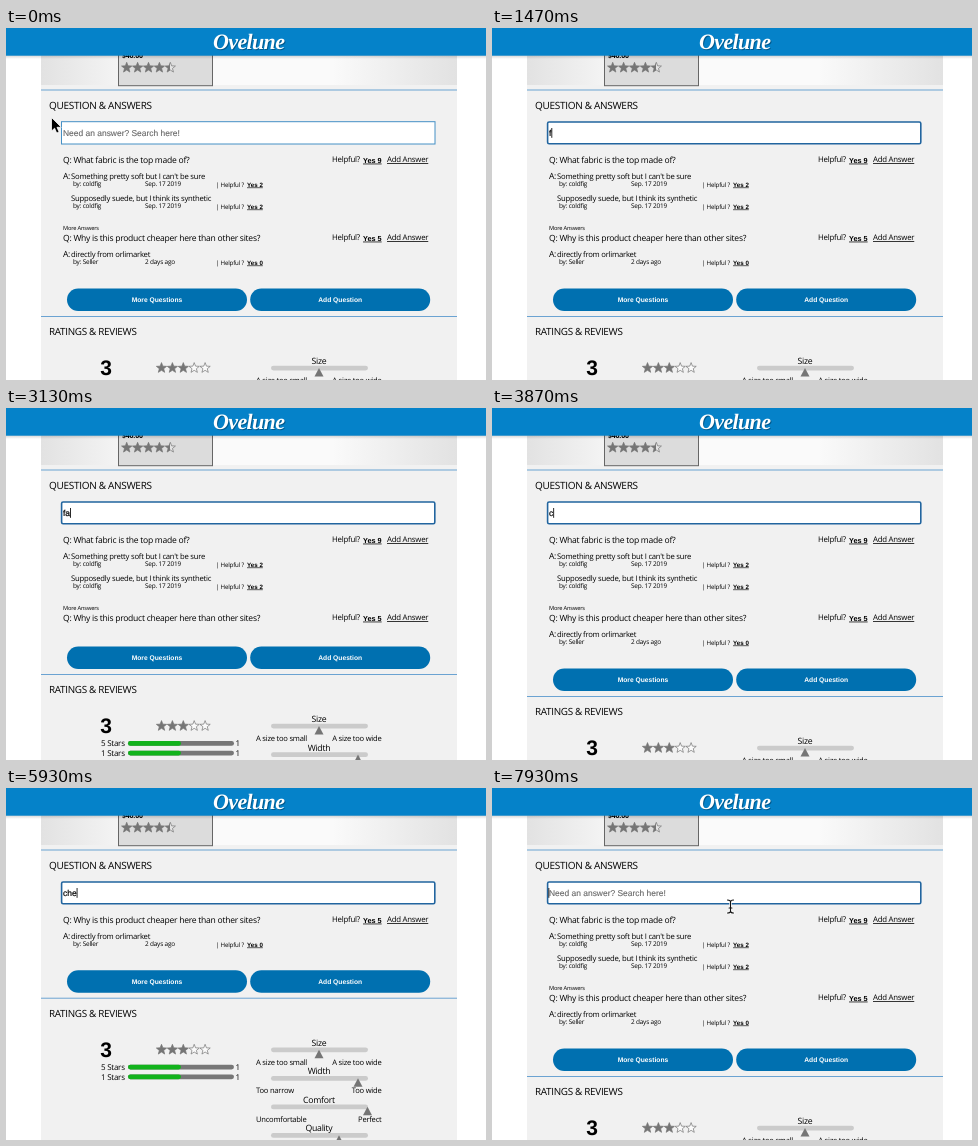
An HTML page for the animation above (8000 ms loop, 480 px wide and 352 px high).

```html
<!DOCTYPE html>
<html lang="en">
<head>
<meta charset="utf-8">
<title>Product questions</title>
<style>
  html, body { margin: 0; width: 100%; height: 100%; overflow: hidden; background: #fff; }
  svg { display: block; width: 480px; height: 352px; }
  text { font-family: "Open Sans", "Noto Sans", sans-serif; letter-spacing: -.03em; fill: #000; text-rendering: geometricPrecision; white-space: pre; }
  .arial { font-family: "Liberation Sans", Arial, sans-serif; letter-spacing: 0; }
  .bold { font-weight: 700; }
  .link { text-decoration: underline; }
  .mid { text-anchor: middle; }
  .end { text-anchor: end; }
  .white { fill: #fff; }
  .hint { fill: #666; stroke: #666; stroke-width: .12px; }
  .typed { stroke: #000; stroke-width: .2px; }
  .logo { font: italic 700 22px "Liberation Serif", "Noto Serif", serif; letter-spacing: -.03em; fill: #fff; }
  .logo.shadow { fill: #035a8d; }
  #beam { fill: none; stroke-linecap: round; }
  .halo { stroke: #fff; stroke-width: 2.4px; }
  .ink { stroke: #111; stroke-width: 1.1px; }
</style>
</head>
<body>
<svg id="stage" viewBox="0 0 480 352"></svg>
<script>
const LOOP = 8000;
const stage = document.getElementById('stage');

const text = (x, y, size, str, cls = '', id = '') =>
  `<text x="${x}" y="${y}" font-size="${size}" class="${cls}" ${id && `id="${id}"`}>${str}</text>`;
const box = (x, y, w, h, fill, extra = '') =>
  `<rect x="${x}" y="${y}" width="${w}" height="${h}" fill="${fill}" ${extra}/>`;
const rule = y => box(35, y, 416, 1, '#6ba3d2');

function star(cx, cy, fill) {
  const pts = Array.from({ length: 10 }, (_, i) => {
    const r = i % 2 ? 2.3 : 5.4, a = (i * 36 - 90) * Math.PI / 180;
    return (cx + r * Math.cos(a)).toFixed(2) + ',' + (cy + r * Math.sin(a)).toFixed(2);
  });
  return `<polygon points="${pts.join(' ')}" fill="${fill}" stroke="#757575" stroke-width=".7"/>`;
}

const stars = (x, y, fills) => fills.map((f, i) => star(x + i * 10.9, y, f)).join('');

const question = (y, str, votes) =>
  text(57, y, 8.55, str) + text(326, y - .6, 7.85, 'Helpful?') +
  text(357, y - .2, 7.3, 'Yes ' + votes, 'arial bold link') +
  text(381, y - .6, 7.8, 'Add Answer', 'link');

const answer = (y, str, by, date, votes) =>
  text(65, y, 7.7, str) + text(67, y + 7, 6.45, 'by: ' + by) +
  text(139, y + 7, 6.45, date) + text(210, y + 7.5, 6.15, '| Helpful ?') +
  text(241, y + 7.5, 6.2, 'Yes ' + votes, 'arial bold link');

const button = (x, label) =>
  box(x, 260.5, 180, 22.5, '#0070b0', 'rx="11.2"') +
  text(x + 90, 274.1, 6.7, label, 'arial bold white mid');

const ratingBar = (y, label) =>
  text(95, y + 3, 8, label) + box(122, y - 2.3, 106, 4.8, '#777', 'rx="2.4"') +
  box(122, y - 2.3, 53, 4.8, '#12b31c', 'rx="2.4"') + text(229.5, y + 3, 8, '1');

const trait = (y, name, low, high, x) =>
  text(313, y, 8.7, name, 'mid') + box(265, y + 1.5, 97, 4.8, '#cbcbcb', 'rx="2.4"') +
  `<path d="M${x} ${y + 3.8}l4.5 8.5h-9z" fill="#757575"/>` +
  text(250, y + 18.8, 7.6, low) + text(375.5, y + 18.8, 7.6, high, 'end');

const grey = '#757575', pale = '#fafafa';
const beam = 'M-3-6.5Q0-6.5 0-4.5Q0-6.5 3-6.5M0-4.5V4.5M-3 6.5Q0 6.5 0 4.5Q0 6.5 3 6.5M-1.5 1.5H1.5';

stage.innerHTML = `
  <defs>
    <linearGradient id="half">
      <stop offset=".5" stop-color="${grey}"/><stop offset=".5" stop-color="#e4e4e4"/>
    </linearGradient>
    <linearGradient id="sheen">
      <stop offset="0" stop-color="#e2e2e2"/><stop offset=".25" stop-color="#fafafa"/>
      <stop offset=".7" stop-color="#fafafa"/><stop offset="1" stop-color="#e2e2e2"/>
    </linearGradient>
    <linearGradient id="shade" x2="0" y2="1">
      <stop offset="0" stop-color="#000" stop-opacity=".18"/><stop offset="1" stop-color="#000" stop-opacity="0"/>
    </linearGradient>
  </defs>
  ${box(0, 0, 480, 352, '#fff')}
  ${box(35, 0, 416, 352, '#f1f1f1')}
  ${box(35, 28, 416, 29, 'url(#sheen)')}
  ${box(112.5, 10.5, 94, 47.2, '#dcdcdc', 'stroke="#666"')}
  ${text(116, 29.6, 7, '$40.00', 'bold')}
  ${stars(120.7, 39.7, [grey, grey, grey, grey, 'url(#half)'])}
  ${rule(61.5)}
  ${text(43, 80.7, 10, 'QUESTION &amp; ANSWERS')}
  <rect id="field" fill="#fff"/>
  ${text(57, 107.6, 8.45, 'Need an answer? Search here!', 'arial hint', 'hint')}
  ${text(57, 107.6, 8.45, '', 'arial typed', 'typed')}
  <rect id="caret" y="100" width=".9" height="9.8" fill="#111"/>
  <g id="first">
    ${question(134.8, 'Q: What fabric is the top made of?', 9)}
    ${text(57, 151, 8.5, 'A:')}
    ${answer(151, "Something pretty soft but I can't be sure", 'coldfig', 'Sep. 17 2019', 2)}
    ${answer(173, 'Supposedly suede, but I think its synthetic', 'coldfig', 'Sep. 17 2019', 2)}
    ${text(57, 202, 5.7, 'More Answers')}
  </g>
  <g id="second">
    ${question(212.8, 'Q: Why is this product cheaper here than other sites?', 5)}
    <g id="reply">
      ${text(57, 229, 8.5, 'A:')}
      ${answer(229, 'directly from orlimarket', 'Seller', '2 days ago', 0)}
    </g>
  </g>
  <g id="lower">
    ${button(61, 'More Questions')}${button(244.2, 'Add Question')}
    ${rule(288)}
    ${text(43, 307.4, 9.9, 'RATINGS &amp; REVIEWS')}
    ${text(100, 347, 21, '3', 'arial bold mid')}
    ${stars(155.5, 340, [grey, grey, grey, pale, pale])}
    ${ratingBar(357.3, '5 Stars')}${ratingBar(367, '1 Stars')}
    ${trait(336.2, 'Size', 'A size too small', 'A size too wide', 313)}
    ${trait(364.8, 'Width', 'Too narrow', 'Too wide', 352)}
    ${trait(393.3, 'Comfort', 'Uncomfortable', 'Perfect', 361.5)}
    ${trait(421.8, 'Quality', 'Poor', 'Perfect', 333)}
  </g>
  ${box(0, 27, 480, 4, 'url(#shade)')}
  ${box(0, 0, 480, 27.7, '#0582c9')}
  <text class="logo shadow mid" x="243.7" y="21.7">Ovelune</text>
  <text class="logo mid" x="242.7" y="20.7">Ovelune</text>
  <circle id="ring" cx="70" cy="99" r="15.5" fill="none" stroke="#15202b" stroke-width="1.6"/>
  <path id="arrow" d="M0 0v13.6l3.1-2.9 2.1 4.9 2.4-1.1-2.1-4.7h4.3z" fill="#000" stroke="#fff" stroke-width=".8"/>
  <g id="beam"><path class="halo" d="${beam}"/><path class="ink" d="${beam}"/></g>`;

const el = {};
stage.querySelectorAll('[id]').forEach(n => el[n.id] = n);

// Each list holds [start time, value] pairs.
const typing = [[0, ''], [1470, 'f'], [1600, 'fa'], [1870, 'fab'], [3070, 'fa'], [3270, 'f'],
  [3470, ''], [3870, 'c'], [4200, 'ch'], [4600, 'che'], [4730, 'chea'], [4800, 'cheap'],
  [5730, 'chea'], [5930, 'che'], [6200, 'ch'], [6470, 'c'], [6530, '']];
const blink = [[0, 0], [670, 1], [1200, 0], [1470, 1], [2330, 0], [2870, 1],
  [5330, 0], [5730, 1], [6800, 0], [7330, 1]];
const layout = [[0, 'all'], [1870, 'fabric'], [3070, 'loading'], [3200, 'all'],
  [4600, 'cheap'], [6200, 'all']];
const shift = { all: 0, fabric: -50, loading: -22, cheap: -78.3 };
// Pointer keys: time, x, y.
const path = [[0, 45.5, 89.5], [130, 43.5, 91], [530, 72.4, 103], [7660, 72.4, 103], [7930, 238.5, 118.5]];

const at = (list, t) => list.reduce((v, [start, value]) => t >= start ? value : v, list[0][1]);
const show = (node, on) => node.setAttribute('visibility', on ? 'visible' : 'hidden');
const move = (node, x, y) => node.setAttribute('transform', `translate(${x} ${y})`);
const set = (node, attrs) => Object.entries(attrs).forEach(([k, v]) => node.setAttribute(k, v));

function pointer(t) {
  const i = path.findIndex(p => p[0] > t);
  if (i < 0) return path[path.length - 1].slice(1);
  const [t0, x0, y0] = path[i - 1], [t1, x1, y1] = path[i];
  let k = (t - t0) / (t1 - t0);
  k = k * k * (3 - 2 * k);
  return [x0 + (x1 - x0) * k, y0 + (y1 - y0) * k];
}

function draw(t) {
  const str = at(typing, t), state = at(layout, t), focused = t >= 670;

  set(el.field, focused
    ? { x: 55.6, y: 94, width: 373.2, height: 21.8, rx: 1.5, stroke: '#22659f', 'stroke-width': 1.6 }
    : { x: 55.5, y: 93.7, width: 373.5, height: 22.3, rx: 0, stroke: '#4590c5', 'stroke-width': 1 });
  if (el.typed.textContent !== str) el.typed.textContent = str;
  show(el.hint, !str);
  set(el.caret, { x: 57 + (str ? el.typed.getComputedTextLength() : -.6) });
  show(el.caret, at(blink, t));

  show(el.first, state !== 'cheap');
  show(el.second, state !== 'fabric');
  show(el.reply, state === 'all' || state === 'cheap');
  move(el.second, 0, state === 'cheap' ? -78 : 0);
  move(el.lower, 0, shift[state]);

  const [x, y] = pointer(t);
  const visible = t < 1470 || t >= 7700;
  const inside = x > 56 && y > 93;
  move(el.arrow, x, y);
  move(el.beam, x, y);
  show(el.arrow, visible && !inside);
  show(el.beam, visible && inside);
  show(el.ring, t >= 670 && t < 870);
}

function frame() {
  draw(performance.now() % LOOP);
  requestAnimationFrame(frame);
}
frame();
</script>
</body>
</html>
```
